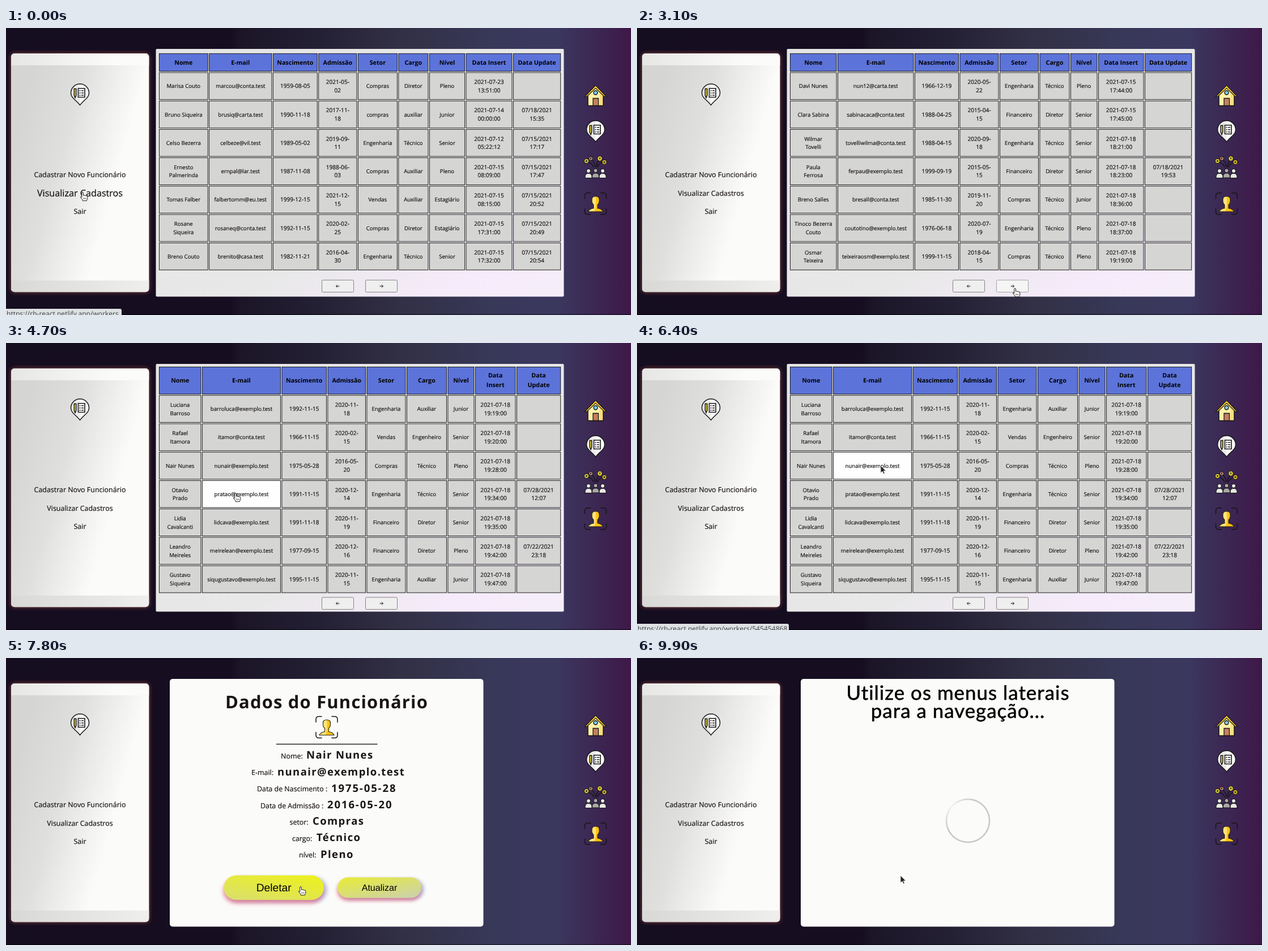
Animation, 1103 px wide and 508 px high, one loop 10000 ms. Source, as an HTML page:

```html
<!DOCTYPE html>
<html lang="pt">
<head>
<meta charset="utf-8">
<title>Funcionários</title>
<style>
html, body { margin: 0; width: 100%; height: 100%; overflow: hidden; background: #150d20; }
svg { display: block; width: 100vw; height: 100vh; }
text { font-family: "Open Sans", "Noto Sans", sans-serif; fill: #1a1416; text-rendering: geometricPrecision; white-space: pre; }
.mid { text-anchor: middle; }
.menu, .label { font-size: 12.45px; }
.cell { font-size: 9.6px; }
.date { font-size: 10.1px; }
.menu, .label, .cell, .date { stroke: #1a1416; stroke-width: .2; }
.head { font-size: 10.7px; font-weight: 700; fill: #000; }
.title { font-size: 31px; font-weight: 700; letter-spacing: 1.16px; }
.value { font-size: 18.5px; font-weight: 700; }
.btn { font-family: "Liberation Sans", Arial, sans-serif; font-size: 16.14px; fill: #000; }
.big { font-family: Lato, sans-serif; font-size: 34.8px; letter-spacing: 1.05px; fill: #000; stroke: #000; stroke-width: .55; stroke-linejoin: round; }
.url { font-size: 12.1px; fill: #3c4043; }
.td { fill: #d5d6d4; }
.th { fill: #5c73d9; }
.td, .th { stroke: #0a0a0a; stroke-width: .9; }
.td.hot { fill: #fefefe; }
.nav { fill: #efefef; stroke: #767676; stroke-width: .9; }
.nav.over { fill: #e8e8e8; stroke: #5c5c5c; }
.nav.down { fill: #f5f5f5; stroke: #9a9a9a; }
.ink { fill: none; stroke: #161616; stroke-width: 1.5; stroke-linecap: round; stroke-linejoin: round; }
</style>
</head>
<body>
<svg id="stage" viewBox="0 0 1103 508" preserveAspectRatio="none">
<defs>
  <linearGradient id="bg">
    <stop offset="0" stop-color="#150d20"/><stop offset=".36" stop-color="#160d21"/>
    <stop offset=".375" stop-color="#1b1527"/><stop offset=".5" stop-color="#242034"/>
    <stop offset=".63" stop-color="#323045"/><stop offset=".78" stop-color="#383859"/>
    <stop offset=".88" stop-color="#3b385f"/><stop offset=".94" stop-color="#3c2854"/>
    <stop offset="1" stop-color="#3e1848"/>
  </linearGradient>
  <linearGradient id="card" gradientUnits="userSpaceOnUse" x1="9" y1="210" x2="196" y2="262">
    <stop offset="0" stop-color="#d5d6d4"/><stop offset=".45" stop-color="#dfe0de"/>
    <stop offset=".62" stop-color="#e8e9e7"/><stop offset="1" stop-color="#fbfbf9"/>
  </linearGradient>
  <linearGradient id="cap"><stop offset="0" stop-color="#e6e6e5"/><stop offset=".75" stop-color="#fbfbfa"/></linearGradient>
  <linearGradient id="foot"><stop offset="0" stop-color="#d8d9d7"/><stop offset="1" stop-color="#efefed"/></linearGradient>
  <linearGradient id="panel" x2="1" y2="1">
    <stop offset="0" stop-color="#e3e4e3"/><stop offset=".6" stop-color="#e8e8e8"/>
    <stop offset=".85" stop-color="#f6ebfb"/><stop offset="1" stop-color="#f5eefa"/>
  </linearGradient>
  <linearGradient id="gDel" x1=".1" y1="1" x2=".9" y2="0"><stop/><stop offset="1"/></linearGradient>
  <linearGradient id="gUpd" x1=".1" y1="0" x2=".9" y2="1"><stop/><stop offset="1"/></linearGradient>
  <filter id="soft" x="-20%" y="-50%" width="140%" height="200%"><feGaussianBlur stdDeviation="3"/></filter>
  <clipPath id="cardClip"><rect x="9" y="45" width="243.3" height="422.3" rx="6"/></clipPath>

  <g id="pin">
    <path d="M17 38.5C11 30 1 26 1 17a16 16 0 1 1 32 0C33 26 23 30 17 38.5Z" fill="#ececec"/>
    <path d="M17 38.5C23 30 33 26 33 17A16 16 0 0 0 17 1Z" fill="#fafafa"/>
    <path class="ink" d="M17 38.5C11 30 1 26 1 17a16 16 0 1 1 32 0C33 26 23 30 17 38.5Z"/>
    <path d="M6.8 9.5h3.4v12l-1.7 4-1.7-4Z" fill="#e9d23a" stroke="#161616" stroke-width="1.5"/>
    <path d="M14 9H25.5V24.5H14Z" fill="#fff" stroke="#161616" stroke-width="1.6"/>
    <path class="ink" d="M16.5 13h1M20 13h3M16.5 17h1M20 17h3M16.5 21h1M20 21h3"/>
  </g>
  <g id="house">
    <path d="M6.5 17 20 4 33.5 17V37H6.5Z" fill="#fff0a8"/>
    <path d="M20 4 33.5 17V37H27V14Z" fill="#fbdf78"/>
    <path d="M1 21 20 1 39 21 35 20.5 20 6 5 20.5Z" fill="#ffd02e" stroke="#161616" stroke-width="1.2"/>
    <path class="ink" d="M6.5 20V37H33.5V20"/>
    <circle cx="20" cy="14" r="3.5" fill="#7ecbf0" stroke="#161616" stroke-width="1.4"/>
    <path d="M15.5 37V24H25V37Z" fill="#c57f5f" stroke="#161616" stroke-width="1.3"/>
  </g>
  <g id="person">
    <path d="M-6 10.5V8Q-6 2.5 0 2.5T6 8V10.5Z"/><circle cy="-2" r="3.5"/>
  </g>
  <g id="team">
    <path class="ink" d="M5 11Q14 12 17 20M13 7Q19 11 20 20M28 8Q22 11 22 20M35 12Q27 11 24 20"/>
    <g stroke="#161616" stroke-width="1.1">
      <circle cx="4.5" cy="9.5" r="4" fill="#f3e13c"/><circle cx="12" cy="5" r="3.4" fill="#d99a8c"/>
      <circle cx="28" cy="5" r="4.2" fill="#f3e13c"/><circle cx="36" cy="11.5" r="4" fill="#eec92c"/>
      <path d="m3 8 3 3m0-3-3 3M10.7 3.7l2.6 2.6m0-2.6-2.6 2.6M26.5 3.5l3 3m0-3-3 3M34.5 10l3 3m0-3-3 3"/>
      <use href="#person" x="8" y="29" fill="#e9e9e4"/><use href="#person" x="33" y="29" fill="#e9e9e4"/>
      <use href="#person" x="20.5" y="28.5" fill="#a9a9a6"/>
    </g>
  </g>
  <g id="face">
    <path class="ink" d="M1 11V6Q1 1 6 1H11M29 1H34Q39 1 39 6V11M39 29V34Q39 39 34 39H29M11 39H6Q1 39 1 34V29"/>
    <path id="bust" d="M13.5 13Q13 7 20 7T26.5 13Q27 19 23.5 22V28Q31 29 33 34H7Q9 29 16.5 28V22Q13 19 13.5 13Z" fill="#ffc414"/>
    <path d="M20 7Q13 7 13.5 13Q13 19 16.5 22V28Q9 29 7 34H18Q22 20 20 7Z" fill="#ffe37c"/>
    <use href="#bust" fill-opacity="0" stroke="#2a2410" stroke-width="1.1"/>
  </g>
</defs>

<rect width="1103" height="508" fill="url(#bg)"/>
<rect y="506.5" width="1103" height="1.5" fill="#000" opacity=".45"/>

<rect x="8" y="44" width="245.3" height="424.3" rx="7" fill="#9a4f40" filter="url(#soft)" opacity=".7"/>
<g clip-path="url(#cardClip)">
  <rect x="9" y="45" width="244" height="423" fill="url(#card)"/>
  <rect x="9" y="45" width="244" height="21" fill="url(#cap)"/>
  <rect x="9" y="447" width="244" height="21" fill="url(#foot)"/>
</g>
<use href="#pin" x="113.5" y="98"/>
<text class="menu mid" x="130.5" y="264">Cadastrar Novo Funcionário</text>
<g id="view"><text class="menu mid" y="4.5">Visualizar Cadastros</text></g>
<text class="menu mid" x="130.5" y="329">Sair</text>

<use href="#house" x="1020.5" y="100.5"/>
<use href="#pin" x="1023.5" y="163"/>
<use href="#team" x="1020" y="226"/>
<use href="#face" x="1020.5" y="291"/>

<g id="tables"><rect x="264.5" y="37" width="720" height="438.5" rx="2" fill="url(#panel)"/></g>
<rect id="sheet" x="289" y="37" width="553.5" height="438.5" rx="5" fill="#fbfbf9"/>
<g id="detail">
  <text class="title mid" x="566" y="88.5">Dados do Funcionário</text>
  <use href="#face" x="546" y="102.5"/>
  <path d="M477 152.5H655.5" stroke="#222" stroke-width="1.6"/>
</g>
<g id="final">
  <text class="big mid" x="566.5" y="73.5">Utilize os menus laterais</text>
  <text class="big mid" x="566.5" y="105.5">para a navegação...</text>
  <g id="ring" fill="none" stroke="#c8c8c8" stroke-width="2.6"></g>
</g>
<g id="status">
  <path id="bar" fill="#dee1e3"/>
  <text id="url" class="url" x="1" y="509.5"></text>
</g>
<g id="arrow">
  <path transform="scale(.9)" d="M0 0V14.5L3.4 11.4 5.8 16.4 8 15.4 5.8 10.6H10.3Z" fill="#222" stroke="#f4f4f4" stroke-width=".9"/>
</g>
<g id="hand">
  <g transform="translate(0 1) scale(.9)" stroke="#1a1a1a">
    <path d="M-1.4 10V1.2Q-1.4-.3 0-.3T1.5 1.2V6Q3 4.5 4.4 6.2 5.6 5 7 6.8 9.8 6 9.8 8.6V11.5Q9.8 13.5 8.4 15V16.4H.2V14.8L-3.9 9.9Q-4.2 8.2-2.8 8.4Z" fill="#fff" stroke-width="1.1" stroke-linejoin="round"/>
    <path d="M2 10.5V13.5M4.3 10.5V13.5M6.6 10.5V13.5" stroke-width=".8"/>
  </g>
</g>
</svg>
<script>
const $ = id => document.getElementById(id);
const LOOP = 10000, ROW = 50.25, CELL = 48.6, GAP = 1.6;
const clamp = v => Math.max(0, Math.min(1, v));
const show = (el, on) => el.setAttribute('display', on ? 'inline' : 'none');

function add(parent, tag, attrs, text) {
  const el = document.createElementNS('http://www.w3.org/2000/svg', tag);
  for (const k in attrs) el.setAttribute(k, attrs[k]);
  if (text) el.textContent = text;
  parent.appendChild(el);
  return el;
}

const heads = ['Nome', 'E-mail', 'Nascimento', 'Admissão', 'Setor', 'Cargo', 'Nível', 'Data Insert', 'Data Update'];

const layouts = [
  { cols: [270, 358.2, 471, 551.3, 621, 692.4, 747, 811.6, 895], top: 44.9, headH: 32, nav: 446, rows: [
    'Marisa Couto;marcou@conta.test;1959-08-05;2021-05-02;Compras;Diretor;Pleno;2021-07-23 13:51:00;',
    'Bruno Siqueira;brusiq@carta.test;1990-11-18;2017-11-18;compras;auxiliar;Junior;2021-07-14 00:00:00;07/18/2021 15:35',
    'Celso Bezerra;celbeze@vil.test;1989-05-02;2019-09-11;Engenharia;Técnico;Senior;2021-07-12 05:22:12;07/15/2021 17:17',
    'Ernesto|Palmerinda;ernpal@lar.test;1987-11-08;1988-06-03;Compras;Auxiliar;Pleno;2021-07-15 08:09:00;07/15/2021 17:47',
    'Tomas Falber;falbertomm@eu.test;1999-12-15;2021-12-15;Vendas;Auxiliar;Estagiário;2021-07-15 08:15:00;07/15/2021 20:52',
    'Rosane|Siqueira;rosaneq@conta.test;1992-11-15;2020-02-25;Compras;Diretor;Estagiário;2021-07-15 17:31:00;07/15/2021 20:49',
    'Breno Couto;brenito@casa.test;1982-11-21;2016-04-30;Engenharia;Técnico;Senior;2021-07-15 17:32:00;07/15/2021 20:54'] },
  { cols: [270, 354, 490, 569.5, 640, 710.5, 765, 814, 896], top: 44.9, headH: 32, nav: 446, rows: [
    'Davi Nunes;nun12@carta.test;1966-12-19;2020-05-22;Engenharia;Técnico;Pleno;2021-07-15 17:44:00;',
    'Clara Sabina;sabinacaca@conta.test;1988-04-25;2015-04-15;Financeiro;Diretor;Senior;2021-07-15 17:45:00;',
    'Wilmar|Tovelli;tovelliwilma@conta.test;1988-04-15;2020-09-18;Engenharia;Técnico;Senior;2021-07-18 18:21:00;',
    'Paula|Ferrosa;ferpau@exemplo.test;1999-09-19;2015-05-15;Financeiro;Diretor;Senior;2021-07-18 18:23:00;07/18/2021 19:53',
    'Breno Salles;bresall@conta.test;1985-11-30;2019-11-20;Compras;Técnico;Junior;2021-07-18 18:36:00;',
    'Tinoco Bezerra|Couto;coutotino@exemplo.test;1976-06-18;2020-07-19;Engenharia;Técnico;Pleno;2021-07-18 18:37:00;',
    'Osmar|Teixeira;teixeiraosm@exemplo.test;1999-11-15;2018-04-15;Compras;Técnico;Pleno;2021-07-18 19:19:00;'] },
  { cols: [270, 346, 486.5, 567.5, 636.5, 707, 779.5, 828, 901], top: 42, headH: 48.7, nav: 450, rows: [
    'Luciana|Barroso;barroluca@exemplo.test;1992-11-15;2020-11-18;Engenharia;Auxiliar;Junior;2021-07-18 19:19:00;',
    'Rafael|Itamora;itamor@conta.test;1966-11-15;2020-02-15;Vendas;Engenheiro;Senior;2021-07-18 19:20:00;',
    'Nair Nunes;nunair@exemplo.test;1975-05-28;2016-05-20;Compras;Técnico;Pleno;2021-07-18 19:28:00;',
    'Otavio|Prado;pratao@exemplo.test;1991-11-15;2020-12-14;Engenharia;Técnico;Senior;2021-07-18 19:34:00;07/28/2021 12:07',
    'Lidia|Cavalcanti;lidcava@exemplo.test;1991-11-18;2020-11-19;Financeiro;Diretor;Senior;2021-07-18 19:35:00;',
    'Leandro|Meireles;meirelean@exemplo.test;1977-09-15;2020-12-16;Financeiro;Diretor;Pleno;2021-07-18 19:42:00;07/22/2021 23:18',
    'Gustavo|Siqueira;siqugustavo@exemplo.test;1995-11-15;2020-11-15;Engenharia;Auxiliar;Junior;2021-07-18 19:47:00;'] }
];

// One bordered box with one or two centred lines of text
function drawCell(g, x, y, w, h, lines, box, cls, gap) {
  const el = add(g, 'rect', { class: box, x: x + .4, y: y + .4, width: w - .8, height: h - .8 });
  const mid = y + h / 2 + 3.6 - gap * (lines.length - 1) / 2;
  lines.forEach((s, i) => add(g, 'text', { class: cls + ' mid', x: x + w / 2, y: mid + i * gap }, s));
  return { el, x, y, w, h };
}

function buildTable(p) {
  const g = add($('tables'), 'g', {}), cells = [];
  const span = c => (p.cols[c + 1] || 980.7) - GAP - p.cols[c];
  heads.forEach((s, c) => drawCell(g, p.cols[c], p.top, span(c), p.headH,
    p.headH > 40 && c > 6 ? s.split(' ') : [s], 'th', 'head', 17));
  p.rows.forEach((row, r) => {
    const y = p.top + p.headH + GAP + r * ROW;
    row.split(';').forEach((s, c) => {
      const lines = c == 3 ? [s.slice(0, 8), s.slice(8)] : c > 6 ? s.split(' ') : s.split('|');
      const cell = drawCell(g, p.cols[c], y, span(c), CELL, lines, 'td', /^\d/.test(s) ? 'date' : 'cell', 14.6);
      cells.push(Object.assign(cell, { row: r }));
    });
  });
  const navs = [557, 634].map((x, i) => {
    const el = add(g, 'rect', { class: 'nav', x: x + .5, y: p.nav + .2, width: 56, height: 21.3, rx: 2 });
    const cx = x + 28.5, cy = p.nav + 11, d = i ? 1 : -1;
    add(g, 'path', { d: `M${cx - 3 * d} ${cy}H${cx + 3 * d}m${-2.5 * d}-2.5l${2.5 * d} 2.5 ${-2.5 * d} 2.5`, fill: 'none', stroke: '#111' });
    return { el, x, y: p.nav, w: 57, h: 22 };
  });
  return { g, cells, next: navs[1] };
}
const tables = layouts.map(buildTable);

[['Nome:', 485, 'Nair Nunes', 530], ['E-mail:', 433, 'nunair@exemplo.test', 479],
 ['Data de Nascimento :', 443, '1975-05-28', 574], ['Data de Admissão :', 449, '2016-05-20', 567],
 ['setor:', 500.5, 'Compras', 541], ['cargo:', 505, 'Técnico', 548], ['nível:', 517, 'Pleno', 555]
].forEach(([label, lx, value, vx], i) => {
  const y = 178.3 + i * 29.2;
  add($('detail'), 'text', { class: 'label', x: lx, y: y - .4 }, label);
  add($('detail'), 'text', { class: 'value', x: vx, y, 'letter-spacing': /^\d/.test(value) ? 1.9 : 1.4 }, value);
});

function pill(label, grad) {
  const g = add($('detail'), 'g', {});
  const box = (dx, dy, more) => add(g, 'rect', Object.assign({ x: dx - 74, y: dy - 18.2, width: 148, height: 36.4, rx: 18.2 }, more));
  box(4.5, 3, { fill: '#8d95c8', opacity: .65, filter: 'url(#soft)' });
  box(-1, 5, { fill: '#e0607c', opacity: .65, filter: 'url(#soft)' });
  box(0, 0, { fill: `url(#${grad})` });
  add(g, 'text', { class: 'btn mid', y: 5.2 }, label);
  return g;
}
const del = pill('Deletar', 'gDel'), upd = pill('Atualizar', 'gUpd');
upd.setAttribute('transform', 'translate(659 406.5)');

// Ring that fades out around one angle
for (let a = 0; a < 360; a += 6) {
  const pt = d => `${38 * Math.cos(d * Math.PI / 180)} ${38 * Math.sin(d * Math.PI / 180)}`;
  add($('ring'), 'path', { d: `M${pt(a)}A38 38 0 0 1 ${pt(a + 6.3)}`, opacity: Math.min(1, .15 + Math.min(a, 360 - a) / 75) });
}

const path = [[0, 135, 290], [600, 135, 290], [800, 300, 486], [900, 300, 486], [1000, 400, 491],
  [1500, 667, 460], [3600, 667, 460], [3800, 540, 320], [4000, 540, 320], [4400, 318, 288], [4700, 405, 265],
  [5200, 405, 265], [6000, 430, 217], [6400, 430, 217], [7000, 453, 211], [7400, 492, 306],
  [7500, 514, 372], [7600, 514, 372], [7700, 520, 404], [9200, 520, 404], [9900, 465, 385]];

function pointer(t) {
  const i = path.findIndex(k => k[0] > t);
  if (i < 0) return path[path.length - 1].slice(1);
  const [t0, x0, y0] = path[i - 1], [t1, x1, y1] = path[i], f = (t - t0) / (t1 - t0);
  return [x0 + (x1 - x0) * f, y0 + (y1 - y0) * f];
}

// Blend from cool grey to yellow
const mix = f => `rgb(${[[190, 240], [198, 243], [226, 18]].map(([a, b]) => Math.round(a + (b - a) * f))})`;
function tint(id, a, b) {
  const s = $(id).children;
  s[0].setAttribute('stop-color', mix(a));
  s[1].setAttribute('stop-color', mix(b));
}

function setStatus(t, row) {
  const alpha = t < 1000 ? 1 : t < 1100 ? .5 : t < 4900 ? 0 : t < 5000 ? .5 : t < 6500 ? 1 : 0;
  const list = t < 2000, w = list ? 204 : 268;
  $('status').setAttribute('opacity', alpha);
  $('bar').setAttribute('d', `M0 497H${w - 3}Q${w} 497 ${w} 500V508H0Z`);
  $('url').textContent = 'https://rh-react.netlify.app/workers' + (list ? '' : row == 2 ? '/545454868' : '/545454867');
}

let hot = null;
function draw(now) {
  const t = Math.floor(now % LOOP / 100) * 100;
  const page = t < 2000 ? 0 : t < 3300 ? 1 : t < 6500 ? 2 : t < 9100 ? 3 : 4;
  const [x, y] = pointer(t);
  const inside = b => x >= b.x && x < b.x + b.w && y >= b.y && y < b.y + b.h;

  show($('tables'), page < 3);
  tables.forEach((p, i) => show(p.g, i == page));
  show($('sheet'), page > 2);
  show($('detail'), page == 3);
  show($('final'), page == 4);

  if (hot) hot.el.classList.remove('hot');
  hot = null;
  let link = t < 700;
  if (page < 3) {
    const { cells, next } = tables[page], over = inside(next);
    hot = cells.find(inside) || null;
    if (hot) hot.el.classList.add('hot');
    const down = t >= 1700 && t < 2000 || t >= 3100 && t < 3300;
    next.el.setAttribute('class', 'nav' + (down ? ' down' : over ? ' over' : ''));
    link = link || over || hot && t < 6400;
  } else if (page == 3) {
    link = t >= 7700;
    const k = (1 - Math.cos((t - 7000) / 1500 * Math.PI)) / 2;
    tint('gDel', .5 + .12 * k, .88 + .12 * k);
    tint('gUpd', .95 - .25 * k, .5 - .45 * k);
    del.setAttribute('transform', `translate(472.7 406.5) scale(${1 + .29 * clamp((t - 7600) / 300)})`);
  } else {
    $('ring').setAttribute('transform', `translate(584 288) rotate(${218 + (t - 9900) * .36})`);
  }

  setStatus(t, hot && hot.row);
  $('view').setAttribute('transform', `translate(130.5 292.5) scale(${t < 700 ? 1.3 : t < 800 ? 1.15 : 1})`);
  show($('hand'), link);
  show($('arrow'), !link);
  $(link ? 'hand' : 'arrow').setAttribute('transform', `translate(${x} ${y})`);
  requestAnimationFrame(tick);
}
const tick = () => draw(performance.now());
tick();
</script>
</body>
</html>
```
